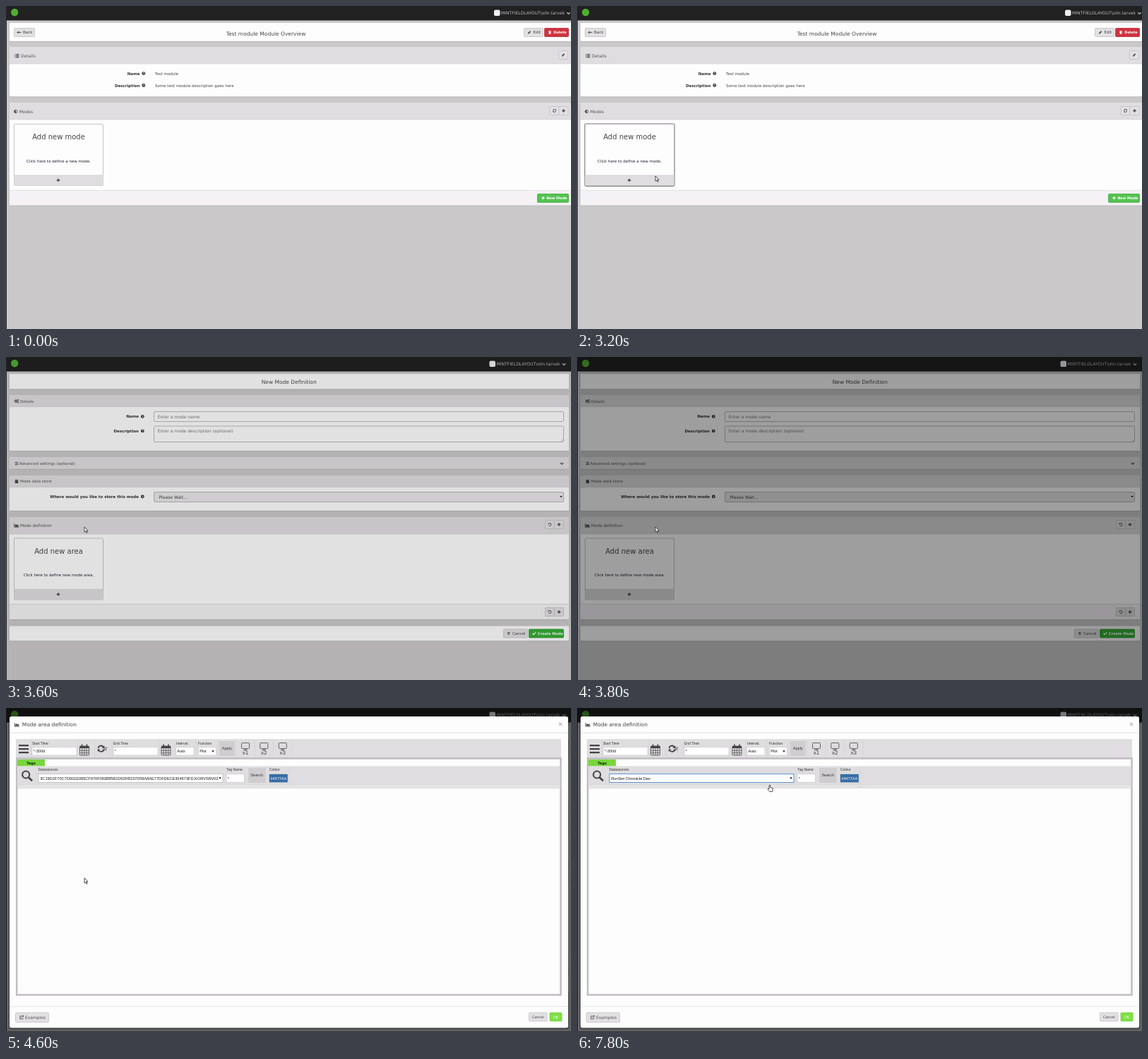
An HTML page that plays this animation: 800x458 px, repeating every 8000 ms.

```html
<!DOCTYPE html>
<html lang="en">
<head>
<meta charset="utf-8">
<title>New mode walkthrough</title>
<style>
html, body { margin: 0; width: 100%; height: 100%; overflow: hidden; background: #cac8c9; }
svg { display: block; width: 100%; height: 100%; }
text { font-family: "DejaVu Sans", Verdana, sans-serif; white-space: pre; }
.b { font-weight: bold; }
.a { font-family: "Liberation Sans", Arial, sans-serif; }
</style>
</head>
<body>
<svg id="stage" viewBox="0 0 800 458"></svg>
<script>
const LOOP = 8000, TICK = 200;
const USER = 'MINTFIELDLAYOUT\\olin.tarvek';
const SOURCES = [
  '3C19D1F70C7D001E095CF970F063B8581D92FB237D59A8AE77DFDECE354673FD.KORVSRV02',
  'RunSet Chronicle Dev'
];
const INK = '#444', HEAD = '#dfdddf', PAPER = '#fefdfe', EDGE = '#c5c3c5';

// Drawing helpers return SVG markup.
const rect = (x, y, w, h, fill, more = '') =>
  `<rect x="${x}" y="${y}" width="${w}" height="${h}" fill="${fill}" ${more}/>`;
const text = (x, y, s, size = 5.5, fill = INK, more = '') =>
  `<text x="${x}" y="${y}" font-size="${size}" fill="${fill}" ${more}>${s}</text>`;
const mid = 'text-anchor="middle"', end = 'text-anchor="end"';
const line = (d, color = INK, w = 1, more = '') =>
  `<path d="${d}" fill="none" stroke="${color}" stroke-width="${w}" ${more}/>`;
const shape = (d, fill = INK, more = '') => `<path d="${d}" fill="${fill}" ${more}/>`;
const at = (x, y, s) => `<g transform="translate(${x} ${y})">${s}</g>`;
const box = (x, y, w, h, fill, stroke, r = 1) =>
  rect(x + .5, y + .5, w - 1, h - 1, fill, `stroke="${stroke}" stroke-width=".8" rx="${r}"`);
const button = (x, y, w, h) => box(x, y, w, h, '#e2e0e2', '#c3c1c3');
const group = (id, s) => `<g id="${id}">${s}</g>`;

// Icons are centred on their own origin.
const icon = {
  plus: (c = INK) => line('M-2.3 0H2.3M0-2.3V2.3', c, 1.3),
  list: () => line('M-3-2H-2M-3 0H-2M-3 2H-2M-1-2H3M-1 0H3M-1 2H3', INK, 1.1),
  half: () => `<circle r="2.2" fill="none" stroke="${INK}" stroke-width=".8"/>` + shape('M0-2.2A2.2 2.2 0 0 0 0 2.2Z'),
  help: () => `<circle r="2.4" fill="#333"/>` + text(0, 1.5, '?', 4, '#fff', mid + ' class="b"'),
  pencil: () => shape('M-2.2 2.2L-1.8 .6L1-2.2L2.2-1L-.6 1.8Z'),
  trash: () => shape('M-2-1.6H2V-.9H-2ZM-.8-2.3H.8V-1.6H-.8ZM-1.6-.6H1.6L1.3 2.4H-1.3Z', '#fff'),
  back: () => line('M3 0H-2.5M-.7-1.8L-2.5 0L-.7 1.8', INK, 1),
  sync: () => line('M-2-.4A2 2 0 0 1 1.7-1.1M2 .4A2 2 0 0 1-1.7 1.1', INK, .9) + shape('M2.4-2.2V-.3H.5ZM-2.4 2.2V.3H-.5Z'),
  undo: () => line('M-1.6-1.2A2 2 0 1 1-1.4 1.5', INK, .9) + shape('M-2.4-2.4V-.3H-.3Z'),
  gears: () => `<circle cx="-1" r="1.5" fill="none" stroke="${INK}" stroke-width="1.2"/><circle cx="2" cy="-1.5" r=".9" fill="none" stroke="${INK}" stroke-width=".8"/><circle cx="2" cy="1.6" r=".9" fill="none" stroke="${INK}" stroke-width=".8"/>`,
  sliders: () => line('M-2.4-1.6H2.4M-2.4 0H2.4M-2.4 1.6H2.4', INK, .6) + line('M-.8-2.2V-1M1-.6V.6M-1 1V2.2', INK, 1),
  store: () => shape('M-2.2-2.4H2.2V-1.2H-2.2ZM-2.2-.8H2.2V2.6H-2.2Z'),
  chart: () => line('M-3.2-2.6V2.4H3.4', INK, .9) + shape('M-2.3 1.6V0L-.8-1.8L.6-.3L2-1.4L3 1.6Z'),
  cross: () => line('M-1.5-1.5L1.5 1.5M1.5-1.5L-1.5 1.5', INK, 1.2),
  check: () => line('M-2.3 0L-.7 1.6L2.4-1.6', '#fff', 1.3),
  chevron: (c = INK) => line('M-2.2-1.1L0 1.1L2.2-1.1', c, 1.2),
  link: () => line('M.3-1.8H-2.2V2.2H1.8V.4', INK, .8) + line('M-.4 .4L2.4-2.4M.6-2.5H2.5V-.6', INK, .8),
  calendar: () => box(-7, -6, 14, 14, 'none', INK) + rect(-6.5, -5.5, 13, 3, INK) +
    line('M-3.5-8V-4.5M3.5-8V-4.5', INK, 1.6) + line('M-6.5 .8H6.5M-6.5 4.2H6.5M-3.2-2.5V7.4M0-2.5V7.4M3.2-2.5V7.4', INK, .7),
  screen: () => box(-6, -4.5, 12, 9, 'none', INK) + line('M0 4V6M-2.8 6.2H2.8', INK, 1)
};
const put = (name, x, y, c) => at(x, y, icon[name](c));

const panel = (y, h, head, right) =>
  rect(5, y, right - 5, h, PAPER) + (head ? rect(5, y, right - 5, head, HEAD) +
  line(`M5 ${y + head}H${right}`, '#d2d0d2', .7) : '') +
  line(`M5 ${y + h + .4}H${right}`, '#b5b3b5', .8);

const label = (x, y, s) => text(x, y, s, 5.5, '#333', end + ' class="b"') + put('help', x + 5.3, y - 2);

const card = (y, title, hint) =>
  box(11, y, 127, 88, PAPER, '#b9b7b9', 1.5) + rect(11.5, y + 73, 126, 14.5, HEAD) +
  line(`M11.5 ${y + 73}H137.5`, '#cac8ca', .6) +
  text(74.5, y + 22, title, 10, INK, mid) + text(74.5, y + 54.5, hint, 5.5, '#223', mid) +
  put('plus', 74, y + 80);

const topbar = x =>
  rect(0, 0, 800, 458, '#cac8c9') + rect(0, 0, 800, 20.5, '#222122') + rect(0, 0, 1, 458, '#2b2a2b') +
  '<circle cx="12.2" cy="9" r="5.2" fill="#4fae32"/>' +
  rect(x - 10, 5.5, 8.5, 8.5, '#f1eef3', 'rx="2"') +
  text(x, 12, USER, 6.05, '#bbb') + put('chevron', x + 95.5, 10.2, '#ccc');

const pair = (x, y, first) =>
  button(x, y, 14, 13) + button(x + 13, y, 14, 13) + put(first, x + 7, y + 6.5) + put('plus', x + 20, y + 6.5);

const overview = topbar(701) +
  panel(24, 26, 0, 800) + button(11, 31, 30, 13) + put('back', 18.5, 37.4) + text(24, 39.3, 'Back') +
  text(368, 42, 'Test module Module Overview', 7.5, INK, mid) +
  button(733, 31, 28, 13) + put('pencil', 741, 37.4) + text(746.5, 39.3, 'Edit') +
  box(762, 31, 35, 13, '#cf3440', '#b62a36') + put('trash', 770, 37.4) + text(775.3, 39.3, 'Delete', 5, '#fff', 'class="b"') +
  panel(58, 70.5, 24, 800) + put('list', 15.3, 70.6) + text(21, 72.7, 'Details', 6, '#555') +
  button(782, 63, 14, 13) + put('pencil', 789, 69.5) +
  label(189.5, 97.6, 'Name') + text(211, 97.6, 'Test module') +
  label(189.5, 114.5, 'Description') + text(211, 114.5, 'Some test module description goes here') +
  panel(137, 145.5, 24, 800) + put('half', 13.8, 149.6) + text(18.7, 151.7, 'Modes', 6, '#555') +
  pair(769.5, 142, 'sync') +
  rect(5, 261.5, 795, 21, '#f4f2f4') + line('M5 261.5H800', '#d8d6d8', .7) +
  rect(11.2, 167.2, 126.6, 88, 'none', 'id="glow" rx="2" stroke="#777" stroke-width="1.6" opacity="0"') +
  card(167, 'Add new mode', 'Click here to define a new mode.') +
  box(752, 266, 45, 13, '#55c251', '#45ab42') + put('plus', 760.5, 272.3, '#fff') +
  text(765.2, 274.2, 'New Mode', 5, '#fff', 'class="b"');

const field = (y, h, s, fill = PAPER) => box(209, y, 581, h, fill, '#aaa8aa', 1.5) + text(214.7, y + 9.6, s, 6, '#777');
const bar = (y, name, s, x = 20) => put(name, 15, y - 2) + text(x, y, s, 5.5, '#555');

const editor = topbar(694.5) +
  panel(24, 21.5, 0, 797) + text(400.7, 37.6, 'New Mode Definition', 7.5, INK, mid) +
  panel(54, 79, 16.5, 797) + bar(64.6, 'gears', 'Details') +
  label(188, 86.3, 'Name') + field(77, 15, 'Enter a mode name') +
  label(188, 106.8, 'Description') + field(97.5, 23.5, 'Enter a mode description (optional)') +
  line('M786 119.5L789 116.5M788 119.5L789 118.5', '#888', .6) +
  panel(142, 17, 17, 797) + bar(153, 'sliders', 'Advanced settings (optional)', 18.8) + put('chevron', 787, 151) +
  panel(168, 50, 16.5, 797) + bar(178.4, 'store', 'Mode data store') +
  label(188, 200, 'Where would you like to store this mode') +
  box(209, 191, 581, 15, '#e8e6e8', '#aaa8aa', 1.5) + text(216.5, 200.8, 'Please Wait...', 6, INK) +
  shape('M784.3 197H787.7L786 199.6Z', '#222') +
  panel(227, 145, 24, 797) + put('chart', 15, 238.8) + text(20, 240.9, 'Mode definition', 5.8, '#555') +
  pair(763, 231, 'undo') + card(256.5, 'Add new area', 'Click here to define new mode area.') +
  rect(5, 350.5, 792, 21.5, '#f4f2f4') + line('M5 350.5H797', '#d0ced0', .7) + pair(763, 355, 'undo') +
  panel(381.5, 21, 0, 797) +
  button(704, 385.5, 35, 13) + put('cross', 711.8, 392) + text(717, 394, 'Cancel') +
  box(740, 385.5, 50, 13, '#35ad35', '#2c992c') + put('check', 747.8, 392) + text(752.8, 394, 'Create Mode', 5, '#fff', 'class="b"');

const tag = (x, y, s) => text(x, y, s, 5, '#333', 'class="a"');
const input = (x, y, w, s) => box(x, y, w, 12.5, '#fff', '#cfcdcf', 0) + text(x + 2.3, y + 8.4, s, 5.5, '#111', 'class="a"');
const press = (x, y, w, s) => rect(x, y, w, 21, '#cfcdd0') + text(x + w / 2, y + 12.3, s, 5.7, '#333', mid + ' class="a"');
const arrow = (x, y) => shape(`M${x - 1.6} ${y - 1.2}H${x + 1.6}L${x} ${y + 1.5}Z`, '#111');
const seps = [35.5, 102, 125.5, 150, 217.5, 238.5, 269.5, 300, 326, 352.5, 378.5, 404.5];

const tools =
  rect(14, 44, 772, 27, HEAD) + seps.map(x => line(`M${x} 45V70`, '#d0ced0', .6)).join('') +
  line('M18 53.2H32M18 58.2H32M18 63.2H32', INK, 2.2) +
  tag(37, 51.5, 'Start Time') + input(36.5, 55, 64, '*-300d') + put('calendar', 111, 59.5) +
  at(134.5, 57.7, `<g transform="scale(2)">${icon.sync()}</g>`) + text(138.6, 61, '#', 8.5, INK, 'class="a"') +
  tag(152, 51.5, 'End Time') + input(151.5, 55, 64, '*') + put('calendar', 226.5, 59.5) +
  tag(241, 51.5, 'Interval.') + input(240, 55, 26.5, 'Auto') +
  tag(272, 51.5, 'Function') + input(272, 55, 26, 'Plot') + arrow(293, 61.5) +
  press(302, 47, 21.5, 'Apply') +
  [339, 365.3, 391.8].map((x, i) => put('screen', x, 53.5) + text(x, 65.5, 'x' + (i + 1), 8, INK, mid + ' class="a"')).join('') +
  rect(15.2, 71.5, 770.3, 335.3, PAPER, 'stroke="#c1bfc1" stroke-width="2.6"') +
  rect(16, 73, 39, 9.5, '#78d63c') + text(35.5, 79.8, 'Tags', 5.2, '#143010', mid + ' class="b"') +
  rect(16.5, 82.5, 768, 27, HEAD) + rect(16.5, 109, 768, 4.8, '#e6e4e6') +
  line('M16.5 109H784.5M16.5 113.8H784.5', '#d0ced0', .5) + line('M400.5 83V109', '#d0ced0', .6) +
  `<g id="grip">${rect(396, 110, 8.5, 3.8, '#f1eff1')}${line('M397 112H404', '#777', 1.2, 'stroke-dasharray="1.2 1.6"')}</g>` +
  '<circle cx="28.2" cy="94.5" r="5" fill="none" stroke="#444" stroke-width="2.1"/>' + line('M31.8 98.2L37 103.3', INK, 2.7) +
  tag(45.5, 89.4, 'Datasources') +
  rect(46, 93.5, 261, 12, '#fff', 'id="select" stroke-width=".9"') +
  text(48.2, 101.6, '', 5.63, '#111', 'id="value" class="a"') + arrow(303, 99.4) +
  tag(312, 89.4, 'Tag Name') + input(311.5, 93.3, 26.5, '*') + press(343, 85, 24.5, 'Search') +
  tag(373, 89.4, 'Colour') + rect(372.8, 93.8, 26, 11.6, '#376ca4') +
  text(385.8, 101.5, '#4477AA', 5.5, '#fff', mid + ' class="a"');

const footer =
  line('M5 423.2H796', '#dddbdd', .8) + button(13, 431.5, 48, 14.5) + put('link', 22, 438.7) + text(27, 440.8, 'Examples', 6, '#555') +
  button(740, 431.5, 26.5, 13) + text(753.3, 439.7, 'Cancel', 5, INK, mid) +
  box(769.5, 431.5, 18, 13, '#7fe045', '#74cf3e') + text(778.5, 439.8, 'OK', 5, '#fff', mid);

const dialog =
  rect(4, 12.5, 793, 443, '#000', 'rx="3" opacity=".35"') + rect(5, 12, 791, 441.5, PAPER, 'rx="2.5"') +
  put('chart', 15.5, 23.7) + text(22.7, 26.2, 'Mode area definition', 7.5, INK) +
  line('M782.8 20.8L787.2 25.2M787.2 20.8L782.8 25.2', '#b5b3b5', 1.1) + line('M5 35.2H796', '#dddbdd', .8) +
  group('tools', tools) + group('footer', footer);

const menu = rect(46, 106, 261, 17.5, '#fff', 'stroke="#6f9bc8" stroke-width=".7"') +
  rect(46.4, 106.4, 260.2, 8.5, '#2f7fdc', 'id="pick"') +
  SOURCES.map((s, i) => text(48.2, 112.6 + i * 8.5, s, 5.63, '#111', `id="item${i}" class="a"`)).join('');

const pointer = shape('M0 0V7.2L1.7 5.7L2.9 8.4L4.1 7.9L2.9 5.3H5Z', '#fff', 'stroke="#222" stroke-width=".8"');
const hand = shape('M0 .8Q.9-.4 1.7 .8V3.8L4.9 4.4Q5.6 4.7 5.4 6L4.6 9.6H.7L-2 6.2Q-2 5-.9 5.3L0 6Z', '#fff', 'stroke="#222" stroke-width=".8"');

document.getElementById('stage').innerHTML =
  group('overview', overview) + group('editor', editor) + rect(0, 0, 800, 458, '#000', 'id="dim"') +
  group('dialog', dialog) + group('menu', menu) +
  group('cursor', group('pointer', pointer) + group('hand', hand));

const el = id => document.getElementById(id);
const show = (id, on) => el(id).setAttribute('display', on ? 'inline' : 'none');
const move = (id, x, y) => el(id).setAttribute('transform', `translate(${x.toFixed(2)} ${y.toFixed(2)})`);
const clamp = v => Math.max(0, Math.min(1, v));

// Cursor stops: time, x, y.
const PATH = [
  [200, 790, 310], [1200, 371, 336], [2400, 111, 241], [5000, 111, 241],
  [6000, 272, 98], [6400, 272, 98], [7000, 272, 117], [7400, 272, 117], [7600, 272, 109]
];

function cursorAt(t) {
  const i = PATH.findIndex(p => p[0] >= t);
  if (i < 0) return PATH[PATH.length - 1].slice(1);
  if (i === 0) return PATH[0].slice(1);
  const [t0, x0, y0] = PATH[i - 1], [t1, x1, y1] = PATH[i];
  const k = (t - t0) / (t1 - t0), e = k * k * (3 - 2 * k);
  return [x0 + (x1 - x0) * e, y0 + (y1 - y0) * e];
}

function draw(t) {
  const [x, y] = cursorAt(t);
  const second = t >= 3400, loaded = t >= 4600, chosen = t >= 7600;
  const open = t >= 6400 && !chosen;

  show('overview', !second);
  show('editor', second);
  el('glow').setAttribute('opacity', x < 138 && y > 167 && y < 255 ? 1 : 0);
  el('dim').setAttribute('opacity', .5 * clamp((t - 3520) / 370));

  show('dialog', t >= 4200);
  move('dialog', 0, -117 * (1 - clamp((t - 4200) / 300)) ** 2);
  show('tools', loaded);
  move('footer', 0, loaded ? 0 : -299);

  el('value').textContent = SOURCES[chosen ? 1 : 0];
  el('select').setAttribute('stroke', t >= 6400 ? '#4d8fd0' : '#c5c3c5');
  show('grip', chosen);
  show('menu', open);
  const row = y > 115 ? 1 : 0;
  el('pick').setAttribute('y', 106.4 + row * 8.5);
  SOURCES.forEach((s, i) => el('item' + i).setAttribute('fill', i === row ? '#fff' : '#111'));

  show('cursor', t >= 200);
  show('pointer', !chosen);
  show('hand', chosen);
  move('cursor', x, y);
}

const start = performance.now();
function tick() {
  const t = (performance.now() - start) % LOOP;
  draw(Math.floor(t / TICK) * TICK);
  requestAnimationFrame(tick);
}
tick();
</script>
</body>
</html>
```
